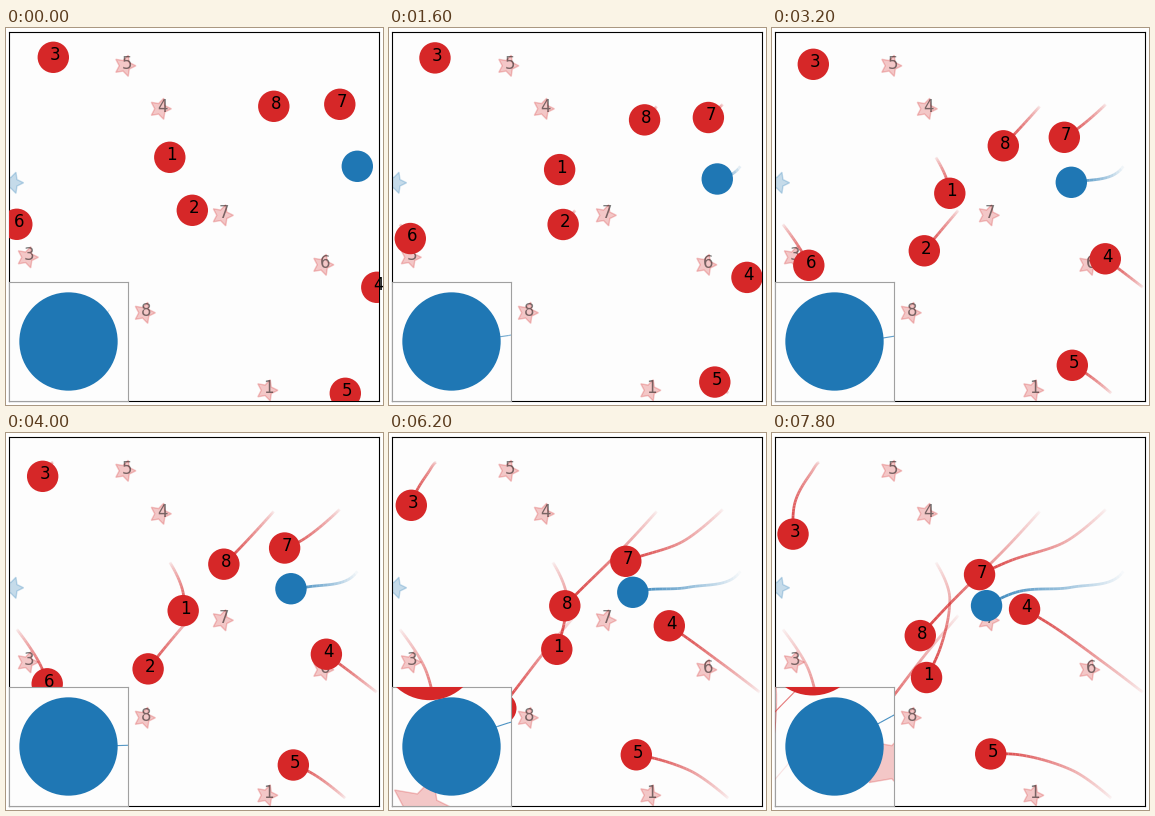
Animation of 377 by 377 pixels, one loop 8 s. Source, as a matplotlib script:

```python
import numpy as np
import matplotlib.pyplot as plt
from matplotlib.animation import FuncAnimation
from matplotlib.collections import LineCollection
from matplotlib.colors import to_rgb
from matplotlib.patches import Circle, Polygon

SIZE, DPI = 377, 100
STEPS, STEP_MS = 40, 200
LEAD = 5                 # the zoomed view runs this many steps ahead
RADIUS, STAR_R = 15.7, 11.1
VIEW = 19                # half width of the zoomed view
NUDGE = 0.3              # centres drawings on the pixel grid
LABEL_DX, LABEL_DY = 2, 2.9
RED, BLUE, PAPER = "#d62728", "#1f77b4", "#fdfdfd"

# Goal, then the positions a robot passes at the key steps
KEYS = np.array([0, 16, 31, STEPS - 1 + LEAD])
ROBOTS = {
    "":  [(6.2, 154.5), (351, 138), (299, 154), (243.5, 159), (196, 182)],
    "1": [(260.5, 362), (163.5, 129), (177.5, 165), (167.5, 216), (145, 262)],
    "2": [(63, 371), (186, 182), (152, 222.5), (111.5, 275), (76, 318)],
    "3": [(21, 229), (47, 29), (41, 36), (22, 72), (21, 120)],
    "4": [(316.5, 236.5), (370.5, 259), (333, 230.5), (280, 192.5), (235, 166)],
    "5": [(118.5, 37.5), (339, 365), (300, 337), (247, 321.5), (200.5, 321)],
    "6": [(21, 229), (10.5, 196), (36.5, 237), (50, 292), (60, 340)],
    "7": [(216, 187), (333.5, 76), (292, 109), (236.5, 128), (189, 150)],
    "8": [(138, 284.5), (267.5, 78), (231, 117.5), (175.5, 172.5), (131, 221)],
}
ROBOTS["4"][0], ROBOTS["6"][0] = (154, 80.5), ROBOTS["4"][0]


def colour(name):
    return RED if name else BLUE


def smooth_path(points, start_speed):
    """Cubic curve through the key positions, sampled at every step."""
    p = np.array(points, float)
    m = np.gradient(p, KEYS, axis=0)
    m[0] = start_speed
    t = np.arange(KEYS[-1] + 1)
    i = np.searchsorted(KEYS[1:-1], t, side="right")
    h = np.diff(KEYS)[i][:, None]
    u = (t - KEYS[i])[:, None] / h
    ease = u * u * (3 - 2 * u)
    return (p[i] + ease * (p[i + 1] - p[i])
            + h * u * (1 - u) * ((1 - u) * m[i] - u * m[i + 1]))


def star(centre):
    angle = np.arange(10) * np.pi / 5
    r = np.where(np.arange(10) % 2, 0.5, 1) * STAR_R
    return np.column_stack([centre[0] + r * np.cos(angle),
                            centre[1] + r * np.sin(angle)])


def pixel_axes(left, top, right, bottom, edge):
    ax = fig.add_axes([left / SIZE, 1 - bottom / SIZE,
                       (right - left) / SIZE, (bottom - top) / SIZE],
                      facecolor=PAPER)
    ax.set(xlim=(left - NUDGE, right - NUDGE),
           ylim=(bottom - NUDGE, top - NUDGE), xticks=[], yticks=[])
    for spine in ax.spines.values():
        spine.set(color=edge, linewidth=0.8)
    return ax


def add_world(ax, trail_width):
    """Goal stars, trails and discs; returns the moving parts."""
    discs, trails = {}, {}
    for name, (goal, *_) in ROBOTS.items():
        ax.add_patch(Polygon(star(goal), color=colour(name), alpha=0.25,
                             linewidth=1, zorder=1))
        trails[name] = ax.add_collection(
            LineCollection([], linewidths=trail_width, capstyle="butt",
                           zorder=3), autolim=False)
        discs[name] = ax.add_patch(
            Circle((0, 0), RADIUS, facecolor=colour(name), linewidth=0,
                   zorder=4))
    return discs, trails


def add_label(name, xy, **style):
    return main.text(xy[0] + LABEL_DX, xy[1] + LABEL_DY, name, fontsize=12,
                     family="DejaVu Sans", ha="center", va="baseline", **style)


def pose(world, step):
    discs, trails = world
    for name, path in paths.items():
        discs[name].center = path[step]
        trails[name].set_segments(
            np.stack([path[:step], path[1:step + 1]], axis=1))
        if step:
            rgba = np.empty((step, 4))
            rgba[:, :3] = to_rgb(colour(name))
            rgba[:, 3] = 0.9 * np.arange(1, step + 1) / step
            trails[name].set_color(rgba)


def draw(step):
    pose(main_world, step)
    for name, label in labels.items():
        x, y = paths[name][step]
        label.set_position((x + LABEL_DX, y + LABEL_DY))
    pose(zoom_world, step + LEAD)
    x, y = paths[""][step + LEAD]
    zoom.set(xlim=(x - VIEW, x + VIEW), ylim=(y + VIEW, y - VIEW))
    return []


# Numbered robots speed up from rest, the blue one is already rolling
paths = {name: smooth_path(keys, (0, 0) if name else (-2, 3))
         for name, (_, *keys) in ROBOTS.items()}

fig = plt.figure(figsize=(SIZE / DPI, SIZE / DPI), dpi=DPI, facecolor="white")
main = pixel_axes(3, 4, 373, 373, "black")
zoom = pixel_axes(3, 254, 122, 373, "#a0a0a0")
zoom.set_zorder(5)

main_world = add_world(main, 2)
zoom_world = add_world(zoom, 0.8)
for name, (goal, *_) in ROBOTS.items():
    if name:
        add_label(name, goal, alpha=0.5, zorder=2)
labels = {name: add_label(name, path[0], color="black", zorder=5)
          for name, path in paths.items() if name}

anim = FuncAnimation(fig, draw, frames=STEPS, interval=STEP_MS,
                     init_func=lambda: draw(0), repeat=True, repeat_delay=0)
plt.show()
```
